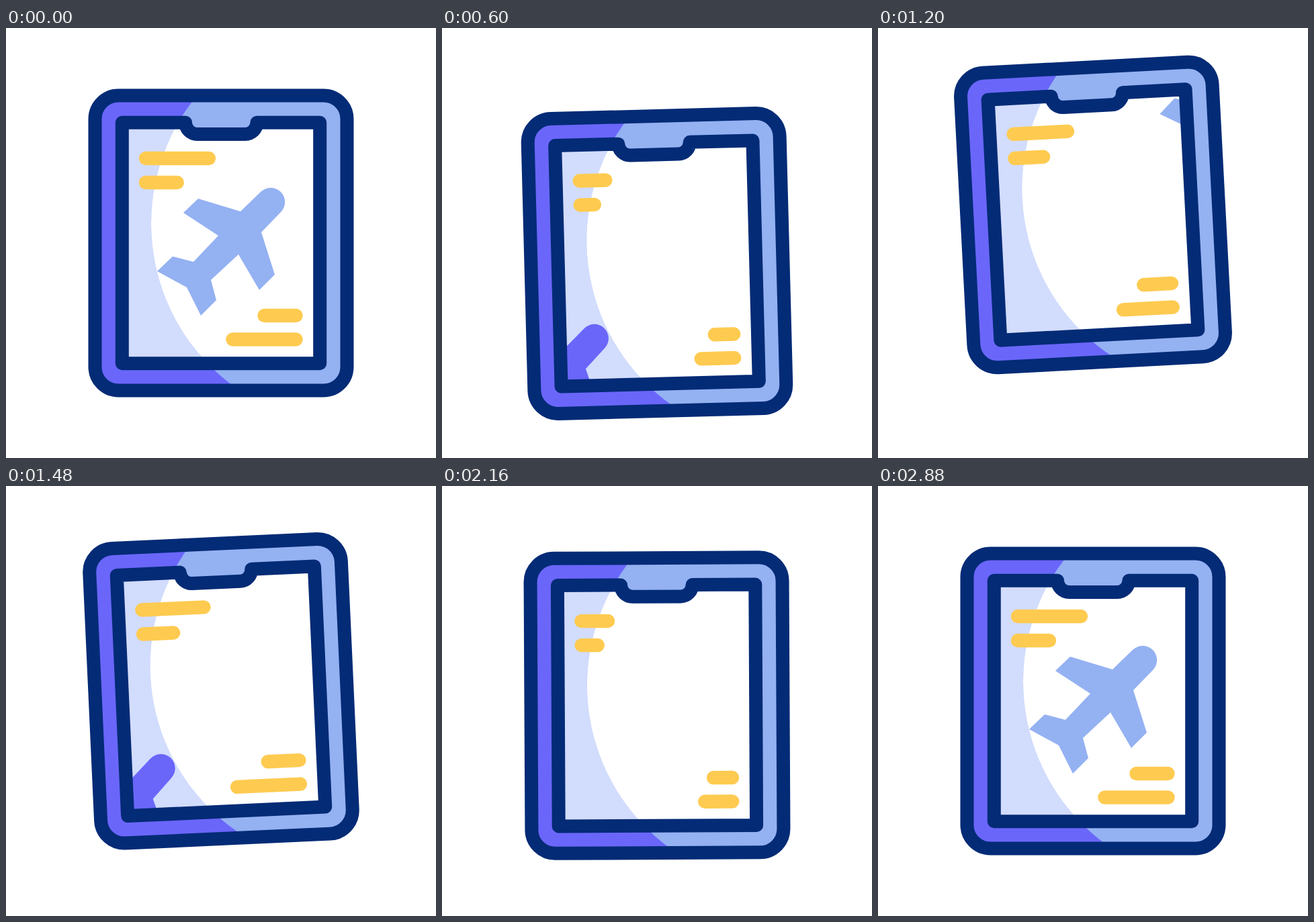
Recreate the animation shown at these times as an HTML page. Size 640x640 px, loop 3 s.

```html
<!DOCTYPE html>
<html lang="en">
<head>
<meta charset="utf-8">
<title>Tablet with plane</title>
<style>
  html, body { margin: 0; width: 100%; height: 100%; overflow: hidden; background: #fff; }
  svg { display: block; width: 100vw; height: 100vh; }
  .frame { fill: none; stroke: #042b76; stroke-width: 20; stroke-linejoin: round; }
  .bar { stroke: #fecb50; stroke-width: 20.4; stroke-linecap: round; }
</style>
</head>
<body>
<svg viewBox="0 0 640 640">
  <defs>
    <rect id="body" x="132.5" y="100.5" width="375" height="439" rx="35"/>
    <path id="screen" d="M172.8 140.7H267A17.5 17.5 0 0 0 284.5 158H356A17.5 17.5 0 0 0 373.5 140.7H467.2V499.2H172.8Z"/>
    <path id="plane" d="M349 273L379 244A21.2 21.2 0 0 1 409 274L380 304L400 367L377 390L346 337L305 375L313 405L290 428L269 386L225 362L248 340L279 348L316 309L264 275L286 254Z"/>
    <clipPath id="inScreen"><use href="#screen"/></clipPath>
    <clipPath id="inLight"><circle cx="516" cy="291" r="300"/></clipPath>
  </defs>
  <g id="tablet">
    <g id="shade"></g>
    <g id="light" clip-path="url(#inLight)"></g>
    <g id="bars"></g>
    <use href="#body" class="frame"/>
    <use href="#screen" class="frame"/>
  </g>
</svg>
<script>
const LOOP = 3000, STEP = 40;
const SWAY = 2400, BEAT = SWAY / 4;
const PASS = 880, LAND = 2720, SETTLE = 160;
const $ = id => document.getElementById(id);

const wave = p => (1 - Math.cos(Math.PI * p)) / 2;
const clamp = (v, lo, hi) => Math.min(hi, Math.max(lo, v));

const lifts = [0, 30.5, -42, 19, 0];
const bars = [
  { x: 208, y: 194, len: 94, shrink: 60, lag: -15 },
  { x: 208, y: 230, len: 47, shrink: 27, lag: -50 },
  { x: 431.5, y: 428, len: -47, shrink: -20.5, lag: 0 },
  { x: 431.5, y: 463.5, len: -94, shrink: -54, lag: 55 }
];

const layer = (body, screen, plane) => `
  <use href="#body" fill="${body}"/>
  <use href="#screen" fill="${screen}"/>
  <g clip-path="url(#inScreen)"><use class="plane" href="#plane" fill="${plane}"/></g>`;

$('shade').innerHTML = layer('#6a66fa', '#d2dcfd', '#6a66fa');
$('light').innerHTML = layer('#94b1f2', '#fff', '#94b1f2');
$('bars').innerHTML = bars.map(b =>
  `<line class="bar" x1="${b.x}" x2="${b.x}" y1="${b.y}" y2="${b.y}"/>`).join('');

const planes = document.querySelectorAll('.plane');
const lines = document.querySelectorAll('.bar');

function tabletPose(t) {
  const s = Math.min(t, SWAY - 1);
  const i = Math.floor(s / BEAT);
  const dy = lifts[i] + (lifts[i + 1] - lifts[i]) * wave(s / BEAT - i);
  return t < SWAY ? { dy, angle: -3 * wave(2 * t / SWAY) } : { dy: 0, angle: 0 };
}

// Steady flight past the centre, then a landing with a small overshoot
function planePose(t) {
  const centre = t < 2.5 * PASS ? Math.round(t / PASS) * PASS : LAND;
  const settle = clamp((t - LAND) / SETTLE, 0, 1);
  const run = t < LAND ? t - centre : 32 * Math.sin(Math.PI * settle);
  const drift = 4.5 * Math.sin(Math.PI * Math.min(t / LAND, 1));
  return { x: 0.618 * run + drift, y: -0.597 * run + drift };
}

// Two shrink-and-grow cycles that gently speed up
function barLength(b, t) {
  const s = t - b.lag;
  const phase = clamp(s / 780 + 8.7e-8 * s * s, 0, 4);
  return b.len - b.shrink * wave(phase);
}

function draw(t) {
  const { dy, angle } = tabletPose(t), { x, y } = planePose(t);
  $('tablet').setAttribute('transform', `translate(0 ${dy}) rotate(${angle} 320 320)`);
  planes.forEach(p => p.setAttribute('transform', `translate(${x} ${y})`));
  bars.forEach((b, i) => lines[i].setAttribute('x2', b.x + barLength(b, t)));
}

const start = performance.now();
function tick() {
  const t = (performance.now() - start) % LOOP;
  draw(Math.floor(t / STEP) * STEP);
  requestAnimationFrame(tick);
}
tick();
</script>
</body>
</html>
```
